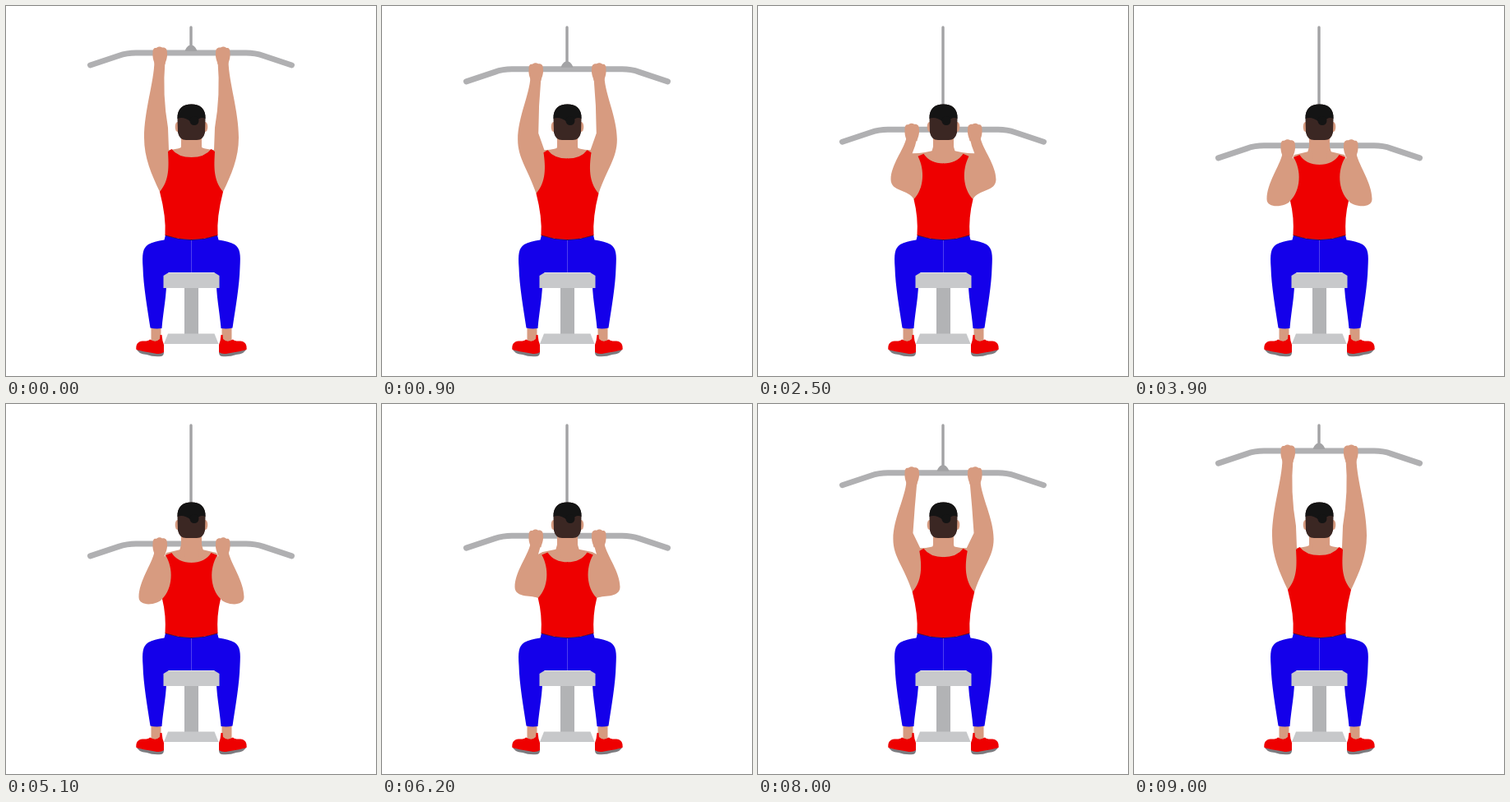
Write an HTML page with a canvas that moves like this. It is 450 px wide and 450 px high and loops after 9100 ms.

```html
<!DOCTYPE html>
<html lang="en">
<head>
<meta charset="utf-8">
<title>Lat pulldown</title>
<style>
html, body { margin: 0; width: 100%; height: 100%; overflow: hidden; background: #fff; }
canvas { display: block; width: 100vmin; height: 100vmin; }
</style>
</head>
<body>
<canvas id="stage" width="450" height="450"></canvas>
<script>
const ctx = document.getElementById('stage').getContext('2d');
const LOOP = 9100, STEP = 100, TURN = 4530, REACH = 113;
const AXIS = 225.5;
const SKIN = '#d79b80', RED = '#ee0000', BLUE = '#1400ea', HAIR = '#141414';

// Share of the pull done: 0 with arms up, 1 with the bar at the neck.
function pullAt(time) {
  const x = 1 - Math.min(1, Math.abs(time - TURN) / TURN);
  return 1 - (1 - x * x) ** 4.8;
}

function fill(color, d) {
  ctx.fillStyle = color;
  ctx.fill(new Path2D(d));
}

function line(color, width, d) {
  ctx.strokeStyle = color;
  ctx.lineWidth = width;
  ctx.lineCap = ctx.lineJoin = 'round';
  ctx.stroke(new Path2D(d));
}

function oval(color, x, y, rx, ry) {
  ctx.fillStyle = color;
  ctx.beginPath();
  ctx.ellipse(x, y, rx, ry, 0, 0, Math.PI * 2);
  ctx.fill();
}

function lowered(drop, draw) {
  ctx.save();
  ctx.translate(0, drop);
  draw();
  ctx.restore();
}

function bothSides(draw) {
  draw();
  ctx.save();
  ctx.translate(2 * AXIS, 0);
  ctx.scale(-1, 1);
  draw();
  ctx.restore();
}

function bar() {
  line('#b0b0b2', 7, 'M102.5 72L137 60.5Q147 57 158 57H292Q303 57 313 60.5L347.5 72');
  fill('#a3a3a5', 'M217.5 55C219 50 222 47.5 225 47.5S231 50 232.5 55Z');
}

function leg() {
  fill(SKIN, 'M176.5 389H188.5V410H176.5Z');
  fill(BLUE, `M194 278.5Q209 284 ${AXIS} 284V330H195C196 350 191 372 189.5 392Q182 393 175.5 391.5C172 368 167 340 166.5 318C165.5 302 166 295 173 290Q180 286 192.5 284.5Z`);
  fill('#7b7b7f', 'M158.5 416L192 419Q192.5 425 189 426Q179 427 171 424Q160 423 158.5 416Z');
  fill(RED, 'M175 405.5Q182 410 187 405L187.5 400H189.5Q190 407 192 412V421Q188 424 181 422.5Q166 420 158.5 418C157.5 411 161 408 166 407.5Q173 408 175 405.5Z');
}

function seat() {
  fill('#b2b3b5', 'M217 342H234V401H217Z');
  fill('#c7c8ca', 'M197 398.5H253.5L258.5 411H192Z');
  fill('#c8c9cb', 'M191.5 328L198 324H253L259.5 328V343H191.5Z');
  line('#e6e6e8', 1, 'M198 324.5H253');
}

// Left arm: a bent limb from wrist over elbow to armpit, and back by the shoulder.
function arm(q, pit) {
  const wy = 67 + REACH * q;
  const ex = 161.5 + 6.5 * (1 - q) ** 3, ey = 160 + 75 * q * q;
  const len = ey - wy;
  const cx = 197 - 46 * q + 42 * q * q, cy = 148 + 38 * q;
  fill(SKIN, `M180.5 ${wy}
    C${180 - 3 * q} ${wy + 0.28 * len} ${ex} ${ey - 0.35 * len} ${ex} ${ey}
    C${ex} ${ey + 25 - 12 * q} ${177 + 9 * q * q} ${ey + 9 + 36 * (1 - q) ** 1.5} ${pit}
    L215 220L217 ${170 + 6 * q}
    Q212 ${174 + 3 * q} ${198 - 3 * q} ${175 + 6 * q * q}
    L${cx} ${cy}
    Q${190 + 2 * q} ${(wy + cy) / 2} 193.5 ${wy}Z`);
}

function vest(q, pit) {
  const neck = 184 + 9 * q, top = 174 + 7 * q;
  fill(RED, `M${AXIS + 0.5} ${neck}Q209 ${neck} 201.5 ${top}L${197 - 3 * q} ${top + 3}
    C${198 + 6 * q} ${195 + 5 * q} ${199 + 4 * q} ${212 + 12 * q} ${pit}
    Q195 257 193.5 279Q209 284 ${AXIS + 0.5} 284Z`);
  line('#35103a', 0.8, `M194 279Q209 284.5 ${AXIS} 284.5`);
}

function hand() {
  fill(SKIN, 'M181 71C180 67 178 64 178.5 57C178.5 52 180 50.5 183 51C185 49 188 49 190 50.5C194 50 196 52 196 57C196.5 64 194 67 193.5 71Z');
}

function head() {
  bothSides(() => oval(SKIN, 208.5, 147, 2.8, 6));
  const crown = 'C208 125 215 119.5 225.5 119.5S243 125 242.5 137';
  fill('#3b2723', `M208.5 137${crown}L242 154Q240 163 232 163H219Q211 163 209 154Z`);
  fill(HAIR, `M208.5 137${crown}Q236 134 231 141H225Q216 134 208.5 137Z`);
  oval(HAIR, 229, 139.5, 5.5, 5.5);
}

function draw(time) {
  const q = pullAt(time), drop = REACH * q;
  const pit = `${187 + 3 * q} ${226 + 11 * q}`;
  ctx.fillStyle = '#fff';
  ctx.fillRect(0, 0, 450, 450);
  line('#a3a3a5', 3.4, `M225 26V${52 + drop}`);
  lowered(drop, bar);
  bothSides(leg);
  seat();
  fill(SKIN, 'M213 155H238V171L246 200H205L213 171Z');
  bothSides(() => {
    arm(q, pit);
    vest(q, pit);
    lowered(drop, hand);
  });
  head();
}

const start = performance.now();
function tick() {
  const t = (performance.now() - start) % LOOP;
  draw(Math.floor(t / STEP) * STEP);
  requestAnimationFrame(tick);
}
tick();
</script>
</body>
</html>
```
